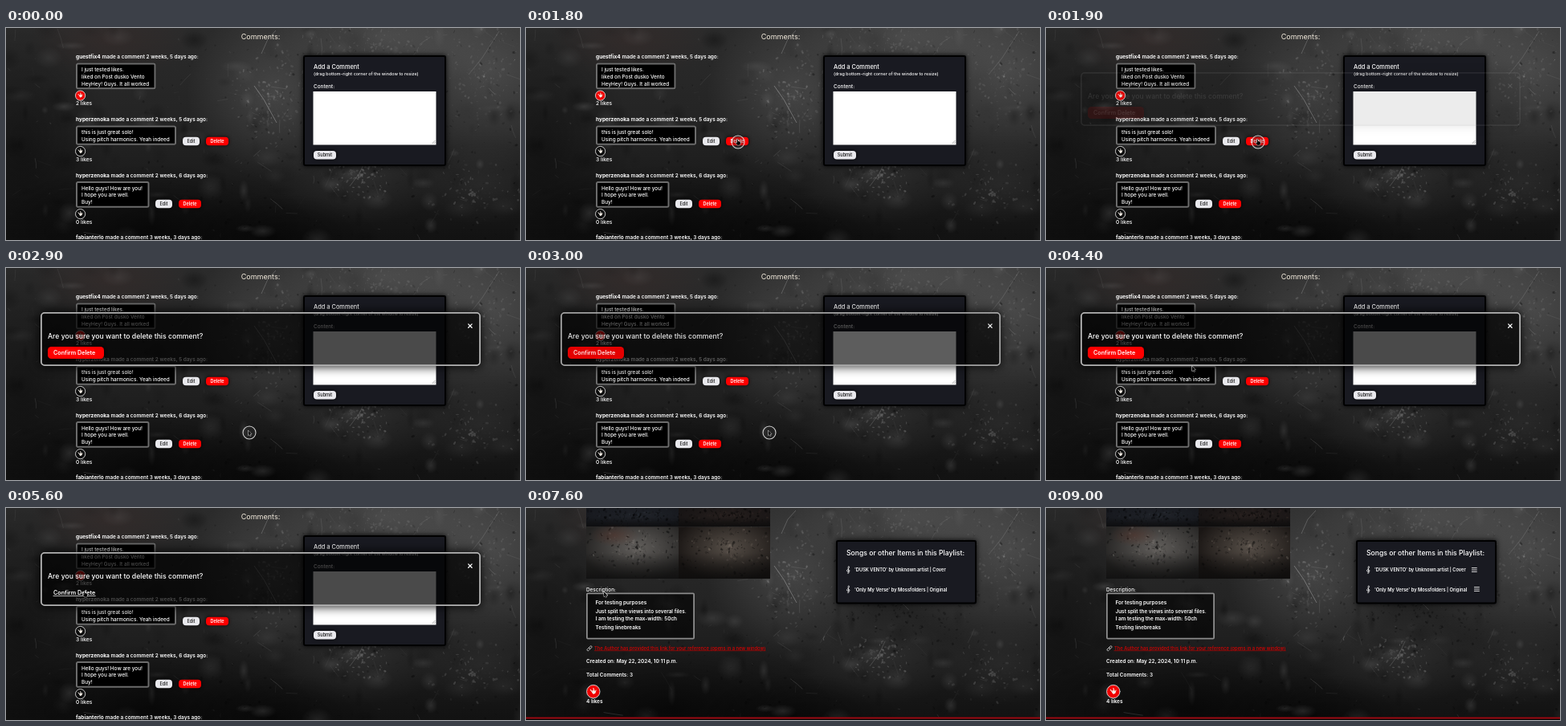
These frames come from a looping animation (640 by 264 pixels, 9500 ms). An HTML page with a canvas:

```html
<!DOCTYPE html>
<html lang="en">
<head>
<meta charset="utf-8">
<title>Comments</title>
<style>
  html, body { margin: 0; width: 100%; height: 100%; overflow: hidden; background: #1c1c1c; }
  canvas { display: block; width: 640px; height: 264px; }
</style>
</head>
<body>
<canvas id="stage"></canvas>
<script>
const W = 640, H = 264, LOOP = 9500, STEP = 100;
const FONT = 'Inter, "Open Sans", sans-serif';
const canvas = document.getElementById('stage');
const ratio = window.devicePixelRatio || 1;
let ctx = prepare(canvas);

function prepare(c) {
  c.width = W * ratio;
  c.height = H * ratio;
  const g = c.getContext('2d');
  g.scale(ratio, ratio);
  return g;
}

function seeded(seed) {
  return () => {
    seed = (seed * 1664525 + 1013904223) >>> 0;
    return seed / 4294967296;
  };
}

const clamp = v => Math.max(0, Math.min(1, v));
const ramp = (t, a, b) => clamp((t - a) / (b - a));
const smooth = v => v * v * (3 - 2 * v);

// ---------- drawing helpers ----------

function text(s, x, y, size = 6.4, { weight = 600, color = '#fff', align = 'left' } = {}) {
  ctx.font = `${weight} ${size}px ${FONT}`;
  ctx.fillStyle = color;
  ctx.textAlign = align;
  ctx.fillText(s, x, y + size * 0.36);
  return ctx.measureText(s).width;
}

function box(x, y, w, h, { fill, line, width = 1, radius = 0, shadow, blur = 0 } = {}) {
  ctx.save();
  ctx.beginPath();
  ctx.roundRect(x, y, w, h, radius);
  if (shadow) {
    ctx.shadowColor = shadow;
    ctx.shadowBlur = blur * ratio;
  }
  if (fill) {
    ctx.fillStyle = fill;
    ctx.fill();
  }
  ctx.shadowColor = 'transparent';
  if (line) {
    ctx.beginPath();
    ctx.roundRect(x + width / 2, y + width / 2, w - width, h - width, radius);
    ctx.strokeStyle = line;
    ctx.lineWidth = width;
    ctx.stroke();
  }
  ctx.restore();
}

function stroke(points, color, width) {
  ctx.beginPath();
  points.forEach(([x, y], i) => i ? ctx.lineTo(x, y) : ctx.moveTo(x, y));
  ctx.strokeStyle = color;
  ctx.lineWidth = width;
  ctx.stroke();
}

function disc(x, y, r, fill, line, width = 1) {
  ctx.beginPath();
  ctx.arc(x, y, r, 0, Math.PI * 2);
  if (fill) {
    ctx.fillStyle = fill;
    ctx.fill();
  }
  if (line) {
    ctx.strokeStyle = line;
    ctx.lineWidth = width;
    ctx.stroke();
  }
}

function glow(x, y, rx, ry, rgb, alpha) {
  ctx.save();
  ctx.translate(x, y);
  ctx.scale(rx, ry);
  const g = ctx.createRadialGradient(0, 0, 0, 0, 0, 1);
  g.addColorStop(0, `rgba(${rgb},${alpha})`);
  g.addColorStop(1, `rgba(${rgb},0)`);
  ctx.fillStyle = g;
  ctx.fillRect(-1, -1, 2, 2);
  ctx.restore();
}

// ---------- backdrop ----------

function scratches(rand, count, x, y, w, h, strength) {
  for (let i = 0; i < count; i++) {
    const px = x + rand() * w, py = y + rand() * h;
    const turn = rand() * Math.PI, len = 2 + rand() ** 3 * 24;
    const dx = Math.cos(turn) * len, dy = Math.sin(turn) * len;
    ctx.beginPath();
    ctx.moveTo(px, py);
    ctx.quadraticCurveTo(px + dx / 2 + rand() * 4 - 2, py + dy / 2, px + dx, py + dy);
    ctx.strokeStyle = `rgba(190,190,190,${rand() * strength})`;
    ctx.lineWidth = 0.3 + rand() * 0.5;
    ctx.stroke();
  }
}

// specks gathered around a point
function grime(rand, count, x, y, rx, ry, rgb, strength) {
  for (let i = 0; i < count; i++) {
    const turn = rand() * Math.PI * 2, far = rand();
    ctx.fillStyle = `rgba(${rgb},${rand() * strength})`;
    ctx.beginPath();
    ctx.ellipse(x + Math.cos(turn) * far * rx, y + Math.sin(turn) * far * ry,
      0.4 + rand() * 2, 0.3 + rand() * 1.3, rand() * 3, 0, Math.PI * 2);
    ctx.fill();
  }
}

function paintBackdrop() {
  const g = ctx.createLinearGradient(0, 0, 0, H);
  g.addColorStop(0, '#2b2b2b');
  g.addColorStop(0.5, '#232323');
  g.addColorStop(1, '#121212');
  ctx.fillStyle = g;
  ctx.fillRect(0, 0, W, H);
  glow(335, 80, 110, 110, '125,125,125', 0.36);
  glow(600, 50, 150, 130, '125,125,125', 0.4);
  glow(470, 10, 140, 70, '125,125,125', 0.38);
  glow(440, 185, 110, 60, '110,110,110', 0.2);
  glow(590, 195, 90, 50, '110,110,110', 0.16);
  glow(130, 15, 100, 50, '80,45,40', 0.2);
  glow(20, 150, 110, 170, '0,0,0', 0.4);
  glow(180, 250, 210, 80, '0,0,0', 0.6);
  glow(340, 265, 130, 60, '0,0,0', 0.5);

  const rand = seeded(71);
  for (let i = 0; i < 150; i++) {
    const tone = rand() < 0.65 ? '0,0,0' : '130,130,130';
    glow(rand() * W, rand() * H, 4 + rand() * 18, 4 + rand() * 14, tone, 0.06 + rand() * 0.18);
  }
  grime(rand, 600, 470, 130, 330, 150, '0,0,0', 0.35);
  grime(rand, 200, 330, 85, 50, 65, '170,170,170', 0.26);
  grime(rand, 140, 460, 20, 90, 30, '170,170,170', 0.2);
  grime(rand, 150, 595, 60, 55, 70, '170,170,170', 0.2);
  grime(rand, 130, 440, 185, 45, 30, '170,170,170', 0.3);
  grime(rand, 100, 580, 205, 60, 40, '170,170,170', 0.26);
  scratches(rand, 130, 0, 0, W, H, 0.25);
  scratches(rand, 70, 290, 0, 350, 230, 0.4);
  stroke([[336, 3], [326, 14], [318, 32]], 'rgba(190,190,190,.4)', 0.7);
  stroke([[309, 72], [321, 89], [337, 118]], 'rgba(200,200,200,.5)', 0.8);
  stroke([[428, 197], [440, 181], [447, 166]], 'rgba(180,180,180,.35)', 0.7);
  stroke([[576, 58], [593, 37], [614, 4]], 'rgba(180,180,180,.3)', 0.7);
}

const backdrop = document.createElement('canvas');
const screen = ctx;
ctx = prepare(backdrop);
paintBackdrop();
ctx = screen;

// ---------- page parts ----------

function likeIcon(x, y, r, on) {
  disc(x, y, r, on ? '#f00000' : '#0b0b0b', '#ddd', 0.9);
  ctx.save();
  ctx.translate(x, y);
  ctx.scale(r / 8, r / 8);
  ctx.rotate(-0.5);
  ctx.lineCap = 'round';
  const c = '#f4eee6';
  box(-1.9, -0.8, 3.9, 3.8, { fill: c, radius: 1.3 });
  stroke([[-1.4, 0], [-1.9, -3.6]], c, 1.1);
  stroke([[1.4, 0], [2, -3.4]], c, 1.1);
  stroke([[0, 0], [0, -1.4]], c, 1.3);
  stroke([[1.5, 1.8], [3.6, 0.2]], c, 1);
  ctx.restore();
}

function button(label, x, y, w, h, fill, color, weight = 500) {
  box(x, y, w, h, { fill, radius: 4, shadow: 'rgba(0,0,0,.9)', blur: 4 });
  text(label, x + w / 2, y + h / 2, 5.5, { color, weight, align: 'center' });
}

function heading(name, when, y) {
  const w = text(name, 87, y, 6.55, { weight: 700 });
  text(`made a comment ${when} ago:`, 87 + w + 1.8, y, 6.45);
}

function comment({ name, when, y, w, lines, likes, liked, buttonX }) {
  heading(name, when, y);
  const h = lines.length * 8.6 + 7;
  box(87, y + 7.5, w, h, { fill: '#000', line: '#6c6c6c', width: 2, radius: 1.5 });
  lines.forEach((s, i) => text(s, 94, y + 16 + i * 8.6, 6.4, { weight: 500 }));
  if (buttonX) {
    const by = y + h - 2.5;
    button('Edit', buttonX, by, 21, 10.5, '#e9e9ed', '#111');
    button('Delete', buttonX + 29, by, 28, 10.5, '#f00', '#fff', 600);
  }
  likeIcon(92.6, y + h + 15.3, 6.1, liked);
  text(`${likes} likes`, 87, y + h + 25.2, 6.6, { weight: 500 });
}

const comments = [
  { name: 'guestfix4', when: '2 weeks, 5 days', y: 36, w: 99.5, likes: 2, liked: true,
    lines: ['I just tested likes.', 'liked on Post dusko Vento', 'HeyHey! Guys. It all worked'] },
  { name: 'hyperzenoka', when: '2 weeks, 5 days', y: 114, w: 125, likes: 3, buttonX: 220,
    lines: ['this is just great solo!', 'Using pitch harmonics. Yeah indeed'] },
  { name: 'hyperzenoka', when: '2 weeks, 6 days', y: 183.5, w: 91.5, likes: 0, buttonX: 186,
    lines: ['Hello guys! How are you!', 'I hope you are well.', 'Buy!'] }
];

function panel(x, y, w, h) {
  box(x, y, w, h, { fill: '#191a21', line: '#000', width: 2, radius: 2, shadow: 'rgba(0,0,0,.9)', blur: 6 });
}

function commentsPage() {
  text('Comments:', 317, 10.3, 9, { weight: 400, color: '#f3ebdd', align: 'center' });
  comments.forEach(comment);
  heading('fabianterlo', '3 weeks, 3 days', 261);

  panel(370, 34, 178, 138);
  text('Add a Comment', 383, 48, 7.4, { weight: 500 });
  text('(drag bottom-right corner of the window to resize)', 383, 57.5, 5.45, { weight: 500 });
  text('Content:', 383, 73, 6.4, { weight: 500 });
  box(382.5, 79, 153, 66.5, { fill: '#fff' });
  stroke([[530.5, 144], [534.5, 140]], '#777', 0.6);
  stroke([[532.7, 144], [534.5, 142.2]], '#777', 0.6);
  button('Submit', 383, 153, 28, 10.5, '#e9e9ed', '#111');
}

function modal(alpha, hover, underlined) {
  if (!alpha) return;
  ctx.save();
  ctx.globalAlpha = alpha;
  // the outer shadow must not show through the translucent fill
  ctx.save();
  ctx.beginPath();
  ctx.rect(0, 0, W, H);
  ctx.roundRect(43, 55, 548, 67, 4);
  ctx.clip('evenodd');
  box(43, 55, 548, 67, { fill: '#000', radius: 4, shadow: '#000', blur: 14 });
  ctx.restore();
  box(43, 55, 548, 67, { fill: 'rgba(0,0,0,.71)', line: '#b4b4b4', width: 1.8, radius: 4 });

  ctx.lineCap = 'round';
  stroke([[575.7, 69.9], [580.1, 74.3]], '#fff', 1.3);
  stroke([[580.1, 69.9], [575.7, 74.3]], '#fff', 1.3);
  text('Are you sure you want to delete this comment?', 52, 85, 8.65, { weight: 500 });

  ctx.globalAlpha = alpha * (1 - hover);
  box(52, 98, 70, 15, { fill: '#f00', radius: 4.5, shadow: 'rgba(0,0,0,.9)', blur: 4 });
  ctx.globalAlpha = alpha;
  const w = text('Confirm Delete', 59, 105.5, 7.2);
  if (underlined) stroke([[59, 109.5], [59 + w, 109.5]], '#fff', 0.7);
  ctx.restore();
}

// dark plate with one soft light and specks around it
function photo(x, y, w, h, base, light, alpha, seed) {
  const cx = x + w * 0.55, cy = y + h * 0.4;
  ctx.save();
  ctx.beginPath();
  ctx.rect(x, y, w, h);
  ctx.clip();
  ctx.fillStyle = base;
  ctx.fillRect(x, y, w, h);
  glow(cx, cy, w * 0.6, h * 0.65, light, alpha);
  const rand = seeded(seed);
  grime(rand, 160, cx, cy, w * 0.6, h * 0.7, '0,0,0', 0.5);
  grime(rand, 70, cx, cy, w * 0.5, h * 0.5, light, alpha * 0.7);
  const shade = ctx.createLinearGradient(0, y + h * 0.5, 0, y + h);
  shade.addColorStop(0, 'rgba(10,10,10,0)');
  shade.addColorStop(1, 'rgba(10,10,10,.7)');
  ctx.fillStyle = shade;
  ctx.fillRect(x, y, w, h);
  ctx.restore();
}

function clef(x, y) {
  ctx.lineCap = 'round';
  ctx.beginPath();
  ctx.moveTo(x - 0.8, y + 4.2);
  ctx.quadraticCurveTo(x + 0.9, y + 5, x + 0.7, y + 3);
  ctx.lineTo(x - 0.2, y - 2.6);
  ctx.bezierCurveTo(x - 0.2, y - 5, x + 1.5, y - 5, x + 1.1, y - 2.8);
  ctx.bezierCurveTo(x + 0.6, y - 0.8, x - 2, y - 0.4, x - 1.8, y + 1.2);
  ctx.bezierCurveTo(x - 1.4, y + 3, x + 2, y + 2.6, x + 1.7, y + 0.9);
  ctx.bezierCurveTo(x + 1.3, y - 0.4, x - 0.6, y, x - 0.2, y + 1.4);
  ctx.strokeStyle = '#fff';
  ctx.lineWidth = 0.75;
  ctx.stroke();
}

function menuIcon(x, y) {
  for (let i = -1; i < 2; i++) stroke([[x - 3, y + i * 2.4], [x + 3, y + i * 2.4]], '#eee', 0.9);
}

function chain(x, y) {
  ctx.save();
  ctx.translate(x, y);
  ctx.rotate(-Math.PI / 4);
  box(-4.2, -1.6, 4.9, 3.2, { line: '#ccc', width: 0.8, radius: 1.4 });
  box(-0.7, -1.6, 4.9, 3.2, { line: '#ccc', width: 0.8, radius: 1.4 });
  ctx.restore();
}

function postPage(menus) {
  photo(75, 0, 115, 23.5, '#16181d', '60,65,75', 0.25, 5);
  photo(190, 0, 114, 23.5, '#171414', '70,55,50', 0.3, 8);
  photo(75, 23.5, 115, 64.5, '#252423', '130,126,122', 0.65, 13);
  photo(190, 23.5, 114, 64.5, '#1a1614', '125,115,105', 0.6, 21);
  glow(110, 34, 30, 14, '100,45,30', 0.3);

  text('Description:', 75, 101.3, 6.4, { weight: 500 });
  box(75, 105.5, 135, 58, { fill: 'rgba(0,0,0,.6)', line: '#8c8c8c', width: 1.8, radius: 1 });
  text('For testing purposes', 86.5, 117.7);
  text('Just split the views into several files.', 86.5, 129);
  text('I am testing the max-width: 50ch', 86.5, 137.6);
  text('Testing linebreaks', 86.5, 149);

  chain(79, 174.8);
  const link = 'The Author has provided this link for your reference (opens in a new window)';
  const w = text(link, 85, 175, 5.8, { color: '#d80000', weight: 500 });
  stroke([[85, 177.7], [85 + w, 177.7]], '#b00000', 0.7);
  text('Created on: May 22, 2024, 10:11 p.m.', 75, 191);
  text('Total Comments: 3', 75, 207.3);
  likeIcon(83.8, 228.6, 8.2, true);
  text('4 likes', 75, 240.7, 6.6);
  box(0, 260.5, W, 4, { fill: '#080808' });
  box(0, 260.5, W, 2, { fill: '#9c0a12' });

  panel(386, 40, 175, 79.5);
  text('Songs or other Items in this Playlist:', 399, 56, 8.65, { weight: 500 });
  clef(401.3, 77);
  text("'DUSK VENTO' by Unknown artist | Cover", 409, 77.2, 5.7);
  clef(401.3, 101.2);
  text("'Only My Verse' by Mossfolders | Original", 409, 101.5, 5.75);
  if (menus) {
    menuIcon(533.3, 77);
    menuIcon(536.4, 101);
  }
}

// ---------- pointer ----------

const path = [
  [100, 326, 260], [600, 302, 236], [800, 298, 226], [1400, 268, 146], [1600, 264, 142],
  [1900, 264, 142], [2700, 303, 205], [3000, 303, 205], [3800, 268, 143],
  [4000, 268, 143], [4800, 98.5, 107], [8000, 98.5, 107], [8200, 103, 112], [9000, 305, 268]
];
const clicks = [1800, 2900, 3900, 5400];
const inside = (p, x, y, w, h) => p.x > x && p.x < x + w && p.y > y && p.y < y + h;

function pointerAt(t) {
  const i = path.findIndex(k => k[0] > t);
  if (i < 1) return null;
  const [t0, x0, y0] = path[i - 1], [t1, x1, y1] = path[i];
  const k = smooth(ramp(t, t0, t1));
  return { x: x0 + (x1 - x0) * k, y: y0 + (y1 - y0) * k };
}

function shape(points) {
  ctx.beginPath();
  points.forEach(([x, y], i) => i ? ctx.lineTo(x, y) : ctx.moveTo(x, y));
  ctx.closePath();
  ctx.lineJoin = 'round';
  ctx.strokeStyle = '#fff';
  ctx.lineWidth = 1.1;
  ctx.stroke();
  ctx.fillStyle = '#000';
  ctx.fill();
}

function drawPointer(p, hand, pressed) {
  if (pressed) disc(p.x, p.y, 8, 'rgba(60,60,60,.3)', 'rgba(225,225,225,.9)', 1.1);
  ctx.save();
  ctx.translate(p.x, p.y);
  ctx.scale(0.85, 0.85);
  if (hand) {
    shape([[-1.4, -4], [-0.3, -4], [0, -1], [1, -1.2], [1.6, -0.7], [2.6, -0.7], [3.4, 0],
      [3.4, 2.4], [2.5, 4.4], [-1, 4.4], [-3.4, 1.2], [-2.8, 0.5], [-1.5, 1.3]]);
  } else {
    shape([[-1.6, -3], [-1.6, 4], [0, 2.5], [1.1, 4.9], [2.2, 4.4], [1.1, 2.1], [3.4, 2]]);
  }
  ctx.restore();
}

// ---------- timeline ----------

function draw(t) {
  ctx.drawImage(backdrop, 0, 0, W, H);
  const p = pointerAt(t);
  let hand = false;
  if (t < 7600) {
    const opened = t < 3900
      ? ramp(t, 1800, 2300) * (1 - ramp(t, 2900, 3400))
      : ramp(t, 3900, 4400);
    const overConfirm = !!p && opened > 0.5 && inside(p, 52, 98, 70, 15);
    hand = overConfirm || (!!p && inside(p, 249, 134, 28, 12));
    commentsPage();
    modal(smooth(opened), ramp(t, 4800, 5100), overConfirm);
  } else {
    postPage(t >= 7700);
  }
  if (p) drawPointer(p, hand, clicks.some(c => t >= c && t < c + 200));
}

function tick() {
  const t = performance.now() % LOOP;
  draw(Math.floor(t / STEP) * STEP);
  requestAnimationFrame(tick);
}
tick();
</script>
</body>
</html>
```
